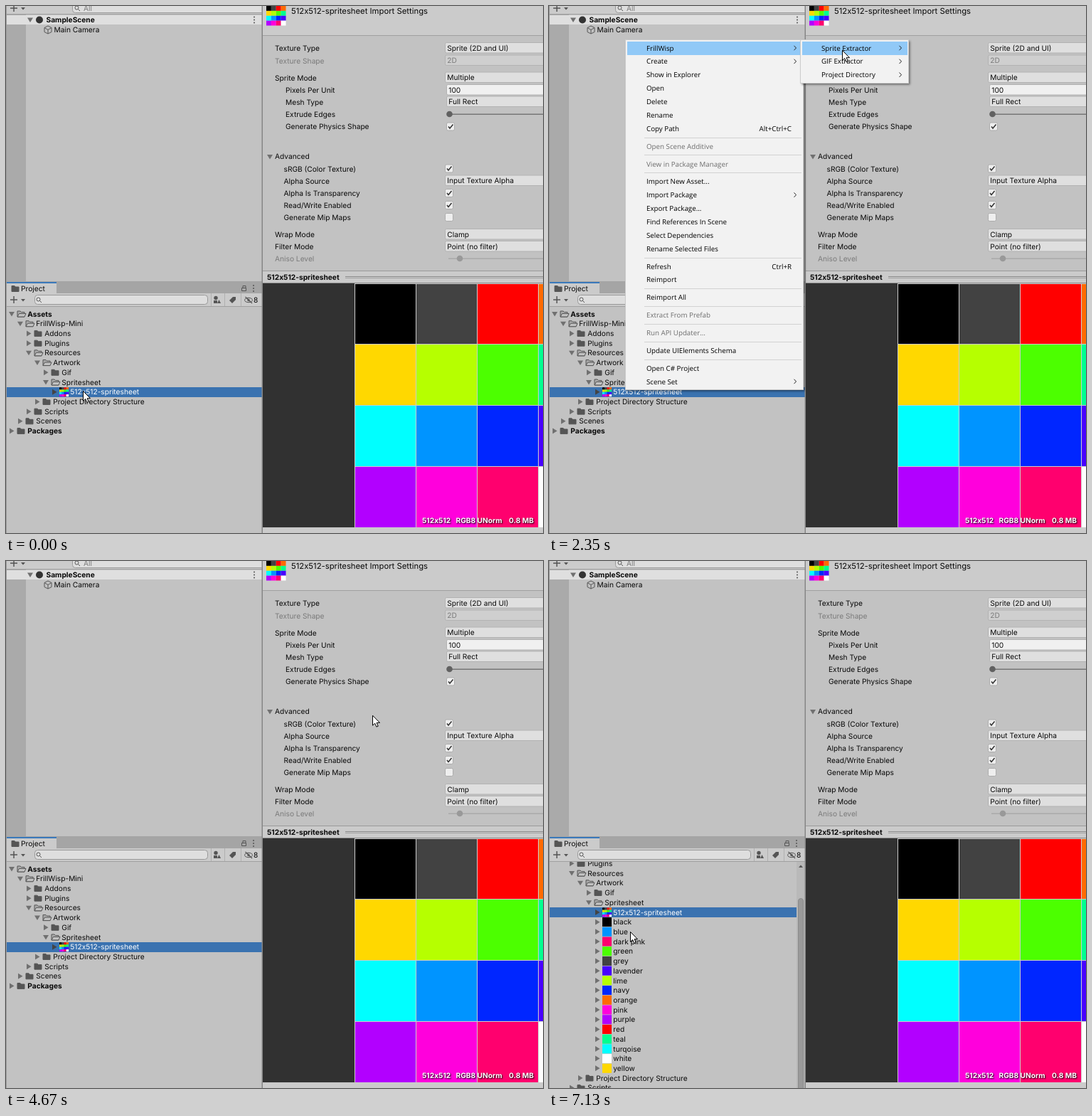
An HTML page with a canvas for the animation above (7.82 s loop, 755 px wide and 741 px high).

```html
<!DOCTYPE html>
<html lang="en">
<head>
<meta charset="utf-8">
<title>Sprite extraction</title>
<style>
html, body { margin: 0; width: 100%; height: 100%; overflow: hidden; background: #c2c2c2; }
canvas { display: block; }
</style>
</head>
<body>
<canvas id="stage" width="755" height="741"></canvas>
<script>
const LOOP = 7820;
const ctx = document.getElementById('stage').getContext('2d');
const UI = '10.2px Inter, sans-serif', BOLD = 'bold ' + UI;
const TITLE = '11.3px Inter, sans-serif', MENU = '9.75px "Open Sans", sans-serif';
const PANEL = '#c2c2c2', BAR = '#cbcbcb', INK = '#090909', DIM = '#7b7b7b', ICON = '#555';

const COLORS = {
  black: '#000', grey: '#424242', red: '#f00', orange: '#ff6a00',
  yellow: '#ffd800', lime: '#b6ff00', green: '#4cff00', teal: '#00ff90',
  turqoise: '#0ff', blue: '#0094ff', navy: '#0026ff', lavender: '#4800ff',
  purple: '#b200ff', pink: '#ff00dc', 'dark pink': '#ff006e', white: '#fff'
};
const SHEET = '512x512-spritesheet', PACKAGE = 'FrillWisp';

// ---------- drawing helpers ----------
function box(x, y, w, h, fill) {
  ctx.fillStyle = fill;
  ctx.fillRect(x, y, w, h);
}
function round(x, y, w, h, r, fill, stroke) {
  ctx.beginPath();
  ctx.roundRect(x, y, w, h, r);
  if (fill) { ctx.fillStyle = fill; ctx.fill(); }
  if (stroke) { ctx.strokeStyle = stroke; ctx.stroke(); }
}
function text(s, x, y, color = INK, font = UI, align = 'left') {
  ctx.font = font;
  ctx.fillStyle = color;
  ctx.textAlign = align;
  ctx.fillText(s, x, y + 3.6);
}
function disc(x, y, r, fill) {
  ctx.beginPath();
  ctx.arc(x, y, r, 0, 7);
  ctx.fillStyle = fill;
  ctx.fill();
}
function line(points, color, width = 1, fill) {
  ctx.beginPath();
  points.forEach(([x, y]) => ctx.lineTo(x, y));
  if (fill) { ctx.closePath(); ctx.fillStyle = fill; ctx.fill(); }
  if (!color) return;
  ctx.strokeStyle = color;
  ctx.lineWidth = width;
  ctx.stroke();
  ctx.lineWidth = 1;
}
function shadow(color, blur, offset) {
  ctx.shadowColor = color;
  ctx.shadowBlur = blur;
  ctx.shadowOffsetX = ctx.shadowOffsetY = offset;
}
const noShadow = () => shadow('transparent', 0, 0);
function arrow(x, y, open, color = '#707070') {
  line(open ? [[x - 4, y - 3], [x + 4, y - 3], [x, y + 3.5]]
            : [[x - 3, y - 4], [x + 3.5, y], [x - 3, y + 4]], null, 0, color);
}
function folder(x, y, open) {
  line([[x, y + 4], [x, y - 4], [x + 4, y - 4], [x + 5.5, y - 2.5], [x + 10, y - 2.5], [x + 10, y + 4]],
    ICON, 1, open ? '#aaa' : ICON);
  if (open) line([[x, y + 4], [x + 2.5, y - .5], [x + 12, y - .5], [x + 10, y + 4]], ICON, 1, PANEL);
}
function sheet(x, y, size) {
  const cell = size / 4;
  Object.values(COLORS).forEach((c, i) => box(x + i % 4 * cell, y + (i >> 2) * cell, cell, cell, c));
}
function plus(x, y) {
  box(x - 5, y - .7, 10, 1.5, ICON);
  box(x - .7, y - 5, 1.5, 10, ICON);
  line([[x + 10, y - 1], [x + 16, y - 1], [x + 13, y + 2.5]], null, 0, ICON);
}
function glass(x, y) {
  ctx.beginPath();
  ctx.arc(x - .5, y - 1, 2.5, 0, 7);
  ctx.strokeStyle = ICON;
  ctx.stroke();
  line([[x + 1.5, y + 1], [x + 4, y + 3.5]], ICON);
}
function dots(x, y) {
  for (const d of [-4, 0, 4]) disc(x, y + d, 1, ICON);
}

// ---------- panels ----------
function hierarchy() {
  box(0, 0, 360, 388, PANEL);
  box(0, 0, 360, 12, BAR);
  plus(11, 3);
  round(93.5, -6.5, 270, 16, 4, '#dedede', '#999');
  glass(100, 3.5);
  text('All', 109, 3.5, DIM);
  box(0, 11, 360, 1, '#a0a0a0');
  box(0, 12, 28, 376, '#aaa');
  box(0, 13, 360, 13, '#dfdfdf');
  arrow(34, 19.5, true);
  disc(47, 19.5, 5, '#333');
  text('SampleScene', 56.5, 19.5, INK, BOLD);
  dots(349, 19.5);
  const [x, y] = [59, 33.5];
  line([[x, y - 5.5], [x + 5, y - 3], [x + 5, y + 3], [x, y + 5.5], [x - 5, y + 3], [x - 5, y - 3], [x, y - 5.5]], ICON);
  line([[x - 5, y - 3], [x, y], [x + 5, y - 3]], ICON);
  line([[x, y], [x, y + 5.5]], ICON);
  text('Main Camera', 67.5, 33.5);
}

const TREE = [
  [0, 'Assets', 1], [1, PACKAGE + '-Mini', 1], [2, 'Addons'], [2, 'Plugins'], [2, 'Resources', 1],
  [3, 'Artwork', 1], [4, 'Gif'], [4, 'Spritesheet', 1], [5, SHEET],
  [3, 'Project Directory Structure'], [2, 'Scripts'], [1, 'Scenes'], [0, 'Packages']
];
const EXPANDED = TREE.slice();
EXPANDED.splice(9, 0, ...Object.keys(COLORS).sort().map(name => [5, name]));

function project(t) {
  const expanded = t >= 5410;
  const scroll = t < 6190 ? 0 : t < 6240 ? 24.4 : 48.8;
  box(0, 387, 360, 354, PANEL);
  box(0, 387, 360, 17, '#a5a5a5');
  box(1, 389, 70, 15, BAR);
  box(1, 388, 70, 2, '#3a79bb');
  folder(8, 397.5);
  text('Project', 21, 397.5);
  round(331.5, 396.5, 6, 4, 0, null, ICON);
  line([[333, 396], [333, 393.5], [337, 393.5], [337, 396]], ICON);
  dots(348, 397);
  box(0, 404, 360, 18, BAR);
  box(0, 422, 360, 1, '#a0a0a0');
  plus(11, 413);
  round(40.5, 406.5, 243, 13, 4, '#dedede', '#999');
  glass(46, 413.5);
  for (const x of [288, 307, 330]) box(x, 404, 1, 18, '#b0b0b0');
  disc(295, 410.5, 2.7, ICON);
  box(292, 414, 5, 4, ICON);
  line([[297, 418], [299.5, 413], [302, 418]], null, 0, ICON);
  line([[314, 414], [319, 409], [323, 409], [323, 413], [318, 418]], null, 0, ICON);
  ctx.beginPath();
  ctx.ellipse(341, 413.5, 5.5, 3.2, 0, 0, 7);
  ctx.strokeStyle = ICON;
  ctx.stroke();
  disc(341, 413.5, 1.7, ICON);
  line([[336.5, 409], [346, 418]], ICON, 1.2);
  text('8', 348, 413.5);

  ctx.save();
  ctx.beginPath();
  ctx.rect(0, 423, 360, 318);
  ctx.clip();
  (expanded ? EXPANDED : TREE).forEach(([depth, name, open], i) => {
    const y = 433 + i * 13.714 - scroll, x = 12 * depth;
    const selected = name === SHEET;
    if (selected) box(1, Math.round(y - 6.8), expanded ? 347 : 359, 14, '#3a72b0');
    arrow(x + 8, y, open, selected ? '#444' : undefined);
    if (selected) sheet(x + 15, y - 6.5, 13);
    else if (COLORS[name]) box(x + 15, y - 6.5, 13, 13, COLORS[name]);
    else folder(x + 16, y, open);
    text(name, x + 30.3, y, selected ? '#fff' : INK, depth ? UI : BOLD);
  });
  if (expanded) {
    box(348, 423, 12, 318, '#b9b9b9');
    line([[351, 431], [354, 427.5], [357, 431]], null, 0, ICON);
    round(350.5, 436 + scroll * .79, 7, 283, 3.5, '#9a9a9a', '#8a8a8a');
  }
  ctx.restore();
}

const LABELS = [
  [378, 59.5, 'Texture Type'], [378, 77, 'Texture Shape', 1], [378, 101, 'Sprite Mode'],
  [393, 118, 'Pixels Per Unit'], [393, 135, 'Mesh Type'], [393, 152.5, 'Extrude Edges'],
  [393, 169.5, 'Generate Physics Shape'], [378, 211.5, 'Advanced'],
  [390.5, 229, 'sRGB (Color Texture)'], [390.5, 246, 'Alpha Source'],
  [390.5, 263, 'Alpha Is Transparency'], [390.5, 280.5, 'Read/Write Enabled'],
  [390.5, 297.5, 'Generate Mip Maps'], [378, 321.5, 'Wrap Mode'],
  [378, 338.5, 'Filter Mode'], [378, 355.5, 'Aniso Level', 1]
];
const FIELDS = [
  [617, 59, 'Sprite (2D and UI)'], [617, 76.5, '2D', 1], [617, 100.5, 'Multiple'],
  [619, 118, '100'], [619, 134.5, 'Full Rect'], [617, 245.5, 'Input Texture Alpha'],
  [617, 321, 'Clamp'], [617, 338, 'Point (no filter)']
];

function checkbox(x, y, checked) {
  round(x - 5.5, y - 5.5, 11, 11, 2, '#eee', '#acacac');
  if (checked) line([[x - 3, y], [x - 1, y + 2.5], [x + 3.5, y - 3]], '#333', 1.5);
}

function inspector() {
  box(361, 0, 394, 741, PANEL);
  box(361, 0, 394, 41, BAR);
  box(361, 41, 394, 1, '#a0a0a0');
  sheet(366, 0, 27.5);
  text(SHEET + ' Import Settings', 401, 7.5, INK, TITLE);
  for (const [x, y, label, dim] of LABELS) text(label, x, y, dim ? DIM : INK);
  for (const [x, y, value, dim] of FIELDS) {
    round(x + .5, y - 7.5, 160, 14.5, 2, value === '100' ? '#f0f0f0' : dim ? '#cfcfcf' : '#dfdfdf', '#b2b2b2');
    text(value, x + 3.3, y, dim ? DIM : INK);
  }
  arrow(371, 212, true);
  box(622, 151.5, 133, 1.5, '#777');
  disc(623.5, 152, 4.3, '#616161');
  box(622, 354.5, 133, 1.5, '#aaa');
  disc(638, 355, 4.3, '#999');
  checkbox(625, 169.5, true);
  for (const y of [228.5, 263, 280, 297]) checkbox(623, y, y < 290);

  box(361, 372, 394, 18, BAR);
  box(361, 372, 394, 1, '#999');
  text(SHEET, 367, 381.5, INK, BOLD);
  box(477, 380, 278, 1, '#8a8a8a');
  box(477, 382, 278, 1, '#a2a2a2');
  box(361, 389, 394, 1, '#888');
  box(361, 390, 394, 343, '#313131');
  sheet(490.75, 390, 343);
  for (let i = 0; i < 5; i++) {
    box(Math.floor(490.75 + i * 85.75), 390, 1, 343, '#ccc');
    box(491, Math.floor(390 + i * 85.75), 264, 1, '#ccc');
  }
  shadow('#000', 2, 1);
  text('512x512', 585, 723, '#fff', BOLD);
  text('RGB8 UNorm', 632.5, 723, '#fff', BOLD);
  text('0.8 MB', 742, 723, '#fff', BOLD, 'right');
  noShadow();
  box(361, 734, 394, 7, BAR);
  box(359.5, 0, 1.5, 741, '#858585');
  box(0, 0, 1, 741, '#999');
}

// ---------- menus: "-" separator, "~" disabled, ">" submenu, "|" shortcut ----------
const ROW = 18.86, PAD = 2.6, TOP = 47;
const MENUS = [
  { x: 107, w: 251, open: 480, items: [
    PACKAGE + '>', 'Create>', 'Show in Explorer', 'Open', 'Delete', 'Rename', 'Copy Path|Alt+Ctrl+C', '-',
    '~Open Scene Additive', '-', '~View in Package Manager', '-',
    'Import New Asset...', 'Import Package>', 'Export Package...', 'Find References In Scene',
    'Select Dependencies', 'Rename Selected Files', '-', 'Refresh|Ctrl+R', 'Reimport', '-', 'Reimport All', '-',
    '~Extract From Prefab', '-', '~Run API Updater...', '-', 'Update UIElements Schema', '-',
    'Open C# Project', 'Scene Set>'] },
  { x: 353, w: 153, open: 1890, items: ['Sprite Extractor>', 'GIF Extractor>', 'Project Directory>'] },
  { x: 501, w: 134, open: 2630, items: ['From Meta>', 'From Source>'] },
  { x: 630, w: 152, open: 3180, items: ['Extract Here', 'Extract Elsewhere'] }
];
const CLOSE = 4390, REOPEN = 3550;
const rowHeight = item => item === '-' ? 6 : ROW;
for (const m of MENUS) m.h = Math.round(2 * PAD + m.items.reduce((sum, item) => sum + rowHeight(item), 0));

function menus(t, px, py) {
  if (t >= CLOSE) return;
  const shown = MENUS.filter(m => t >= m.open);
  const topOf = i => i === 3 && t >= REOPEN ? Math.round(TOP + ROW) : TOP;
  const hovered = shown.findLastIndex((m, i) =>
    px > m.x && px < m.x + m.w && py > topOf(i) && py < topOf(i) + m.h);
  shown.forEach((m, i) => {
    const top = topOf(i), right = m.x + m.w;
    const opened = i === 3 && t >= REOPEN ? REOPEN : m.open;
    const parentRow = i === 2 && t >= REOPEN ? 1 : 0;
    ctx.globalAlpha = Math.min(1, (t - opened + 40) / 140);
    shadow('rgba(0,0,0,.5)', 3, 1.5);
    box(m.x, top, m.w, m.h, '#ccc');
    noShadow();
    box(m.x + 1, top + 1, m.w - 2, m.h - 2, '#f2f2f2');
    let y = top + PAD;
    m.items.forEach((item, n) => {
      const h = rowHeight(item), mid = y + h / 2;
      if (item === '-') box(m.x + 27, Math.round(mid), m.w - 30, 1, '#d2d2d2');
      else {
        const active = i < hovered ? n === parentRow : i === hovered && py >= y && py < y + h;
        if (active) box(m.x + 3, Math.round(y), m.w - 5, 19, '#91c9f7');
        const [label, shortcut] = item.replace(/[~>]/g, '').split('|');
        text(label, m.x + 30, mid, item[0] === '~' ? '#6d6d6d' : '#000', MENU);
        if (shortcut) text(shortcut, right - 17, mid, '#000', MENU, 'right');
        if (item.endsWith('>')) line([[right - 13.5, mid - 3.2], [right - 10.5, mid], [right - 13.5, mid + 3.2]], '#222');
      }
      y += h;
    });
  });
  ctx.globalAlpha = 1;
}

function dialog(t) {
  if (t < 5180 || t >= 5410) return;
  ctx.globalAlpha = Math.min(1, (t - 5150) / 130);
  shadow('rgba(0,0,0,.5)', 4, 0);
  box(-5, 315, 308, 74, '#404040');
  noShadow();
  box(0, 341, 302, 47, '#f0f0f0');
  text('Importing', 3.5, 328.5, '#fff', MENU);
  round(6.5, 351.5, 287, 11, 0, '#e6e6e6', '#bcbcbc');
  text(PACKAGE + '-Mini\\Resources\\Artwork\\Spritesheet\\white.png', 6, 372.5, '#000', MENU);
  ctx.globalAlpha = 1;
}

// ---------- pointer ----------
const smooth = k => k * k * (3 - 2 * k), easeOut = k => 1 - (1 - k) ** 2;
const MOVES = [
  [530, 1100, 207, 170], [1150, 1610, 207, 61, easeOut], [1930, 2350, 412, 62],
  [2580, 2950, 545, 62], [2950, 3320, 568, 86], [3600, 4100, 656, 78],
  [4420, 5130, 164, 562], [5910, 5960, 151, 563], [6800, 7130, 114, 521]
];
function pointerAt(t) {
  let x = 108, y = 541;
  for (const [start, end, toX, toY, ease = smooth] of MOVES) {
    if (t <= start) break;
    const k = ease(Math.min(1, (t - start) / (end - start)));
    x += (toX - x) * k;
    y += (toY - y) * k;
  }
  return [x, y];
}
function pointer(t, x, y) {
  if (t >= 360 && t < 530 || t >= 4190 && t < CLOSE) disc(x, y, 11, 'rgba(225,222,60,.7)');
  const shape = [[0, 0], [0, 14], [3.2, 11], [5.4, 16], [7.7, 15], [5.6, 10.2], [10, 10.2], [0, 0]];
  line(shape.map(([dx, dy]) => [x + dx + .5, y + dy + .5]), '#000', 1, '#fff');
}

function frame(now) {
  const t = now % LOOP, [x, y] = pointerAt(t);
  ctx.textRendering = 'geometricPrecision';
  hierarchy();
  project(t);
  inspector();
  menus(t, x, y);
  dialog(t);
  pointer(t, x, y);
  requestAnimationFrame(() => frame(performance.now() - begin));
}
const begin = performance.now();
frame(0);
</script>
</body>
</html>
```
